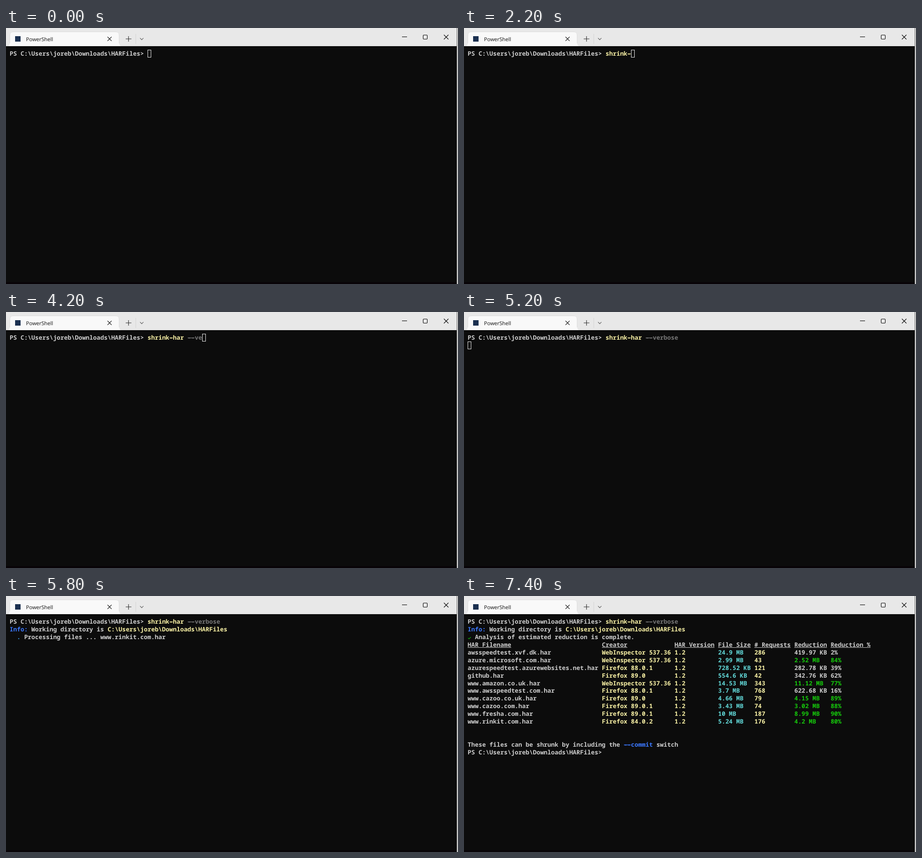
Animation, 993 px wide and 564 px high, one loop 8000 ms. Source, as an HTML page:

```html
<!DOCTYPE html>
<html lang="en">
<head>
<meta charset="utf-8">
<title>Terminal session</title>
<style>
  html, body { margin: 0; width: 100%; height: 100%; overflow: hidden; background: #0c0c0c; }
  svg { display: block; width: 993px; height: 564px; }
  text { white-space: pre; text-rendering: geometricPrecision; }
  #screen text { font: 600 13.29px "Noto Sans Mono", "DejaVu Sans Mono", monospace; font-variant-ligatures: none; }
  #tab-title { font: 500 11.5px "Open Sans", "Noto Sans", sans-serif; }
</style>
</head>
<body>
<svg viewBox="0 0 993 564" xmlns="http://www.w3.org/2000/svg">
  <rect width="993" height="564" fill="#0c0c0c"/>
  <rect y="560" width="991" height="4" fill="#080307"/>
  <rect width="991" height="40" fill="#e8e8e8"/>
  <path d="M2 40q6 0 6-6V16q0-8 8-8H241q8 0 8 8V34q0 6 6 6z" fill="#f9f9f9"/>
  <path d="M8.500 34V16q0-7.500 7.500-7.500H241q7.500 0 7.500 7.500V34" fill="none" stroke="#dcdcdc"/>
  <rect x="20" y="18" width="12" height="12" fill="#1b3050"/>
  <text id="tab-title" x="44" y="28.500" fill="#111">PowerShell</text>
  <path d="M285 13V35" stroke="#d4d4d4"/>
  <g fill="none" stroke="#222" stroke-width="1.100">
    <path d="M223 19.500l9 9m0-9l-9 9"/>
    <path d="M263 24H275.500M269.200 18V30"/>
    <path d="M294.500 22.200l3.700 3.700 3.700-3.700" stroke="#555"/>
    <path d="M870 19.500H881" stroke="#000"/>
    <rect x="916.500" y="15.500" width="9" height="9" rx="1.500" stroke="#000"/>
    <path d="M962 15l10 10m0-10l-10 10" stroke="#000"/>
  </g>
  <rect x="990" width="1" height="564" fill="#747474"/>
  <rect x="991" width="2" height="564" fill="#d0d0d0"/>
  <g id="screen"></g>
</svg>
<script>
const LOOP = 8000, TICK = 200;
const CELL = 7.974, ROW = 16.94, LEFT = 8, TOP = 48;
const GREY = '#cccccc', DIM = '#767676', YELLOW = '#f9f1a5', BLUE = '#3b78ff',
      CYAN = '#61d6d6', TEAL = '#3a96dd', GREEN = '#16c60c', WHITE = '#f2f2f2';

const FOLDER = 'C:\\Users\\joreb\\Downloads\\HARFiles';
const PROMPT = `PS ${FOLDER}> `;
const COMMAND = 'shrink-har', COMMAND_LINE = COMMAND + ' --verbose';
// Tick at which each character of the command line appears.
const KEY_TICKS = [4, 5, 6, 7, 8, 9, 11, 13, 13, 14, 16, 17, 18, 20, 21, 22, 22, 23, 24, 25];

const COLUMNS = [0, 37, 57, 69, 79, 90, 100];
const HEADERS = 'HAR Filename|Creator|HAR Version|File Size|# Requests|Reduction|Reduction %'.split('|');
const FILES = `awsspeedtest.xvf.dk|WebInspector 537.36|24.9 MB|286|419.97 KB|2
azure.microsoft.com|WebInspector 537.36|2.99 MB|43|2.52 MB|84
azurespeedtest.azurewebsites.net|Firefox 88.0.1|728.52 KB|121|282.78 KB|39
github|Firefox 89.0|554.6 KB|42|342.76 KB|62
www.amazon.co.uk|WebInspector 537.36|14.53 MB|343|11.12 MB|77
www.awsspeedtest.com|Firefox 88.0.1|3.7 MB|768|622.68 KB|16
www.cazoo.co.uk|Firefox 89.0|4.66 MB|79|4.15 MB|89
www.cazoo.com|Firefox 89.0.1|3.43 MB|74|3.02 MB|88
www.fresha.com|Firefox 89.0.1|10 MB|187|8.99 MB|90
www.rinkit.com|Firefox 84.0.2|5.24 MB|176|4.2 MB|80`.split('\n').map(line => line.split('|'));
const SPINNER = ['.', '..', '...', ' ..', '  .', ''];

const screen = document.getElementById('screen');
const xOf = col => LEFT + col * CELL;
const topOf = row => Math.round(TOP + row * ROW);
const baseOf = row => topOf(row) + 13;
const bar = (x, y, width, height, fill) =>
  `<rect x="${x}" y="${y}" width="${width}" height="${height}" fill="${fill}"/>`;

function print(row, col, text, fill = GREY) {
  let out = `<text x="${xOf(col)}" y="${baseOf(row)}" fill="${fill}">${text}</text>`;
  // Dashes span their cells, so adjacent ones join.
  for (const dash of text.matchAll(/-+/g)) {
    out += bar(xOf(col + dash.index) + 0.5, baseOf(row) - 4.6, dash[0].length * CELL - 1, 1.4, fill);
  }
  return out;
}

function cursor(row, col) {
  const x = Math.round(xOf(col));
  return `<rect x="${x + 0.5}" y="${topOf(row) + 0.5}" width="7" height="16" fill="none" stroke="${WHITE}"/>`;
}

function commandLine(tick) {
  const count = KEY_TICKS.filter(key => key <= tick).length;
  const col = PROMPT.length;
  let out = print(0, 0, PROMPT) + print(0, col, COMMAND.slice(0, count), YELLOW);
  if (count > COMMAND.length + 1) {
    out += print(0, col + COMMAND.length + 1, COMMAND_LINE.slice(COMMAND.length + 1, count), DIM);
  }
  if (tick < 26 && (tick < 2 || tick >= 4)) out += cursor(0, col + count);
  return out;
}

function progress(fileNumber) {
  const [name] = FILES[fileNumber - 1];
  return print(2, 0, SPINNER[fileNumber % SPINNER.length], TEAL) +
    print(2, 4, `Processing files ... ${name}.har`);
}

function report() {
  const y = baseOf(2);
  let out = `<path d="M9 ${y - 2.500}l2 2 4-4" fill="none" stroke="#13a10e" stroke-width="1.300"/>` +
    print(2, 2, 'Analysis of estimated reduction is complete.');
  HEADERS.forEach((title, i) => {
    out += print(3, COLUMNS[i], title) +
      bar(xOf(COLUMNS[i]), baseOf(3) + 1, title.length * CELL, 1, GREY);
  });
  FILES.forEach(([name, creator, size, requests, saved, percent], i) => {
    const savedColour = percent >= 75 ? GREEN : GREY;
    const cells = [name + '.har', creator, '1.2', size, requests, saved, percent + '%'];
    const colours = [GREY, YELLOW, YELLOW, CYAN, YELLOW, savedColour, savedColour];
    cells.forEach((text, c) => { out += print(4 + i, COLUMNS[c], text, colours[c]); });
  });
  return out + print(16, 0, 'These files can be shrunk by including the') +
    print(16, 43, '--commit', BLUE) + print(16, 52, 'switch') + print(17, 0, PROMPT);
}

function draw(tick) {
  let out = commandLine(tick);
  if (tick === 26) out += cursor(1, 0);
  if (tick >= 27) {
    out += print(1, 0, 'Info:', BLUE) + print(1, 6, 'Working directory is') + print(1, 27, FOLDER, YELLOW);
  }
  if (tick >= 27 && tick < 30) out += progress([1, 5, 10][tick - 27]);
  if (tick >= 30) out += report();
  if (tick === 30 || (tick >= 34 && tick < 37)) out += cursor(17, PROMPT.length);
  screen.innerHTML = out;
}

let shown = -1;
function update() {
  const tick = Math.floor((performance.now() % LOOP) / TICK);
  if (tick !== shown) draw(shown = tick);
  requestAnimationFrame(update);
}
update();
</script>
</body>
</html>
```
